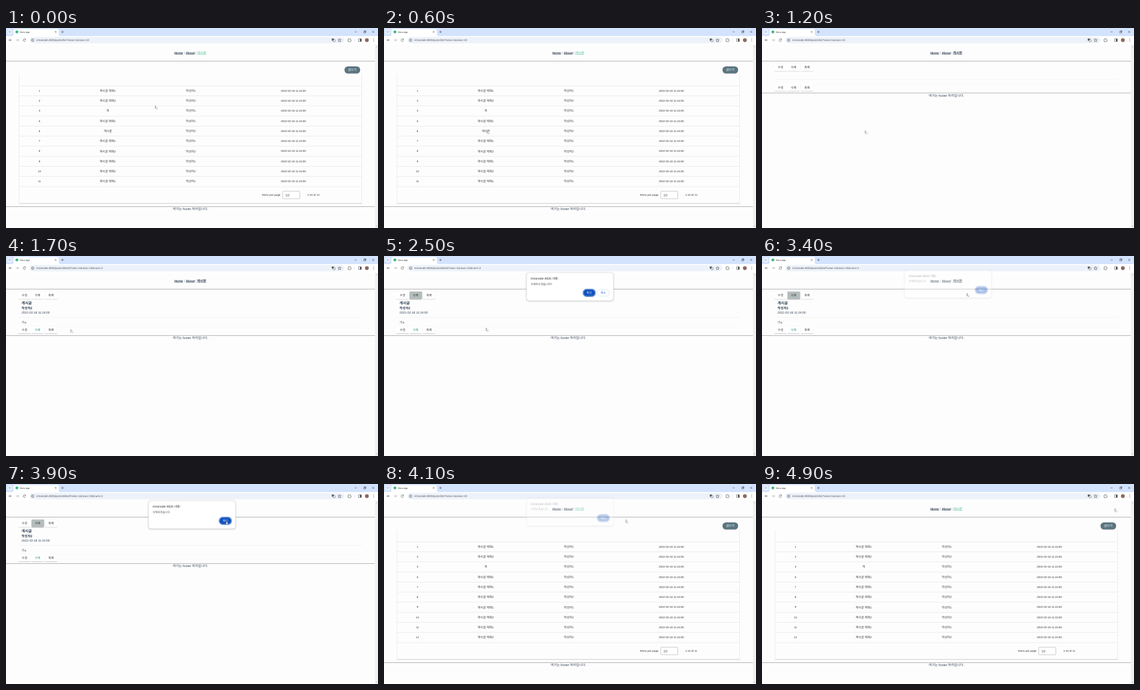
Recreate the animation shown at these times as an HTML page. Size 600x323 px, loop 5100 ms.

```html
<!DOCTYPE html>
<html lang="ko">
<head>
<meta charset="utf-8">
<title>Board</title>
<style>
  html, body { margin: 0; width: 100%; height: 100%; overflow: hidden; background: #fefdfe; }
  svg { display: block; width: 100vw; height: 100vh; }
  text {
    font-family: "Liberation Sans", "Noto Sans CJK KR", "Noto Sans CJK JP", sans-serif;
    white-space: pre;
    text-rendering: geometricPrecision;
  }
  .b { font-weight: 700; }
  .line { fill: none; stroke: #444; stroke-width: .6; }

  .list1, .blank, .detail, .list2, .ripple, .ask, .done, .urlList, .cursor {
    animation: 5100ms step-end infinite;
  }
  .list1 { animation-name: list1; }
  .blank { animation-name: blank; }
  .detail { animation-name: detail; }
  .list2 { animation-name: list2; }
  .urlList { animation-name: url; }
  .ripple { animation-name: ripple; }
  .ask { animation-name: ask; }
  .done { animation-name: done; }
  .cursor { animation-name: cursor; }

  @keyframes list1 { 0% { visibility: visible } 21.5%, 100% { visibility: hidden } }
  @keyframes blank { 0% { visibility: hidden } 21.5% { visibility: visible } 25.43%, 100% { visibility: hidden } }
  @keyframes detail { 0% { visibility: hidden } 25.43% { visibility: visible } 80.33%, 100% { visibility: hidden } }
  @keyframes list2 { 0% { visibility: hidden } 80.33%, 100% { visibility: visible } }
  @keyframes url { 0% { visibility: visible } 25.43% { visibility: hidden } 80.33%, 100% { visibility: visible } }
  @keyframes ripple { 0% { visibility: hidden } 43.08% { visibility: visible } 80.33%, 100% { visibility: hidden } }

  @keyframes ask {
    0% { opacity: 0; transform: translateY(-4.5px) }
    45.04% { opacity: .35; transform: translateY(-4.5px) }
    47% { opacity: 1; transform: none }
    64.64% { opacity: .35; transform: translateY(-4.5px) }
    66.6%, 100% { opacity: 0; transform: translateY(-4.5px) }
  }
  @keyframes done {
    0% { opacity: 0; transform: translateY(-4.5px) }
    66.6% { opacity: .35; transform: translateY(-4.5px) }
    68.57% { opacity: 1; transform: none }
    80.33% { opacity: .3; transform: translateY(-4.5px) }
    82.29%, 100% { opacity: 0; transform: translateY(-4.5px) }
  }
  @keyframes cursor {
    0% { transform: translate(241px, 125.3px); animation-timing-function: steps(3) }
    5.82% { transform: translate(166.6px, 165.5px) }
    33.27% { transform: translate(104.6px, 118.3px); animation-timing-function: steps(2) }
    37.2% { transform: translate(50px, 63px) }
    47% { transform: translate(110px, 120px); animation-timing-function: steps(2) }
    50.92% { transform: translate(220px, 112px); animation-timing-function: steps(2) }
    54.84% { transform: translate(296px, 85px) }
    58.76% { transform: translate(305.5px, 72.5px); animation-timing-function: steps(2) }
    62.68% { transform: translate(331px, 60px) }
    72.48% { transform: translate(343px, 60px); animation-timing-function: steps(2) }
    76.4% { transform: translate(355px, 60.5px) }
    80.33% { transform: translate(390.5px, 57.5px); animation-timing-function: steps(7) }
    94.05%, 100% { transform: translate(569.5px, 39.5px) }
  }
</style>
</head>
<body>
<svg id="stage" viewBox="0 0 600 323" preserveAspectRatio="none">
  <defs>
    <filter id="soft" x="-20%" y="-40%" width="140%" height="190%">
      <feDropShadow dx="0" dy=".6" stdDeviation=".6" flood-color="#000" flood-opacity=".32"/>
    </filter>
    <filter id="lift" x="-10%" y="-20%" width="120%" height="150%">
      <feDropShadow dx="0" dy=".5" stdDeviation=".9" flood-color="#000" flood-opacity=".32"/>
    </filter>
  </defs>
</svg>
<script>
  const INK = '#2c3e50', DARK = '#333', BLUE = '#0f52bd';
  const HOST = 'intranode:4826';

  // y is the middle of the line of text
  const text = (x, y, s, size, fill = DARK, anchor = 'start', cls = '') =>
    `<text x="${x}" y="${y + size * .36}" font-size="${size}" fill="${fill}" text-anchor="${anchor}" class="${cls}">${s}</text>`;
  const mid = (x, y, s, size, fill, cls) => text(x, y, s, size, fill, 'middle', cls);
  const rect = (x, y, w, h, fill, r = 0, more = '') =>
    `<rect x="${x}" y="${y}" width="${w}" height="${h}" rx="${r}" fill="${fill}" ${more}/>`;
  const path = (d, more = 'class="line"') => `<path d="${d}" ${more}/>`;
  const group = (cls, ...parts) => `<g class="${cls}">${parts.join('')}</g>`;
  const hr = y => rect(0, y, 595, 1, '#b6b6b6');

  function browser() {
    const url = HOST + '/posts/';
    return [
      rect(0, 0, 600, 13, '#d3e3fd'),
      rect(2, 2.2, 8, 8, '#e6effd', 2.5),
      path('M4.8 5.6 L6 6.9 L7.2 5.6'),
      path('M10 13 Q12 13 12 11 V4.5 Q12 1.8 14.7 1.8 H82.5 Q85.2 1.8 85.2 4.5 V11 Q85.2 13 87.2 13Z', 'fill="#fff"'),
      '<circle cx="17.6" cy="6.3" r="2.4" fill="#41b883"/>',
      text(22.5, 6.4, 'Moru App', 3.7),
      path('M78.9 5.1 l2.4 2.4 m0 -2.4 l-2.4 2.4'),
      path('M89 6.3 h4 m-2 -2 v4'),
      path('M562.3 6.3 h3.4 M577 5.4 h2.6 v2.6 h-2.6z M577.9 5.4 v-.9 h2.6 v2.6 h-.9 M590.7 4.7 l3.2 3.2 m0 -3.2 l-3.2 3.2'),
      rect(0, 13, 600, 14, '#fff'),
      path('M9.3 19.5 H5 m2 -2 l-2 2 l2 2'),
      path('M16 19.5 h4.3 m-2 -2 l2 2 l-2 2', 'class="line" style="stroke:#999"'),
      path('M31.2 18.4 A2 2 0 1 0 31.5 20.2 M31.6 17.2 v1.6 h-1.6'),
      rect(38, 14.6, 508, 10.2, '#edf2fa', 5.1),
      '<circle cx="43" cy="19.6" r="2.1" class="line"/>',
      path('M43 19.3 v1.4 M43 18.2 v.5'),
      group('urlList', text(49, 19.7, url + 'list?view=1&amp;rows=10', 4.48, '#555')),
      group('detail', text(49, 19.7, url + 'detail?view=1&amp;rows=10&amp;num=4', 4.48, '#555')),
      rect(525.5, 17, 3.4, 3.6, '#555', .5),
      rect(527.8, 18.8, 3, 3.4, '#fff', .5, 'stroke="#555" stroke-width=".6"'),
      path('M538 17 l.8 1.7 1.9 .2 -1.4 1.3 .4 1.9 -1.7 -1 -1.7 1 .4 -1.9 -1.4 -1.3 1.9 -.2z'),
      path('M551.8 17.8 h1.4 a.8 .8 0 0 1 1.6 0 h1.2 v1.4 a.8 .8 0 0 1 0 1.6 v1.2 h-4.2z'),
      rect(561.8, 17, .5, 5, '#c5d7f5'),
      path('M568.7 17.5 h4.4 v4.2 h-4.4z'),
      rect(571, 17.5, 2.1, 4.2, '#444'),
      '<circle cx="582" cy="19.6" r="3.1" fill="#8a6a5d"/>',
      ...[17.6, 19.6, 21.6].map(y => `<circle cx="593" cy="${y}" r=".5" fill="#444"/>`),
      rect(595, 27, 5, 296, '#f1f1f1'),
      path('M596.3 30.8 l1.2 -1.4 1.2 1.4z M596.3 319.3 l1.2 1.4 1.2 -1.4z', 'fill="#a3a3a3"')
    ].join('');
  }

  function nav(active) {
    const c = active ? '#42c08a' : INK;
    return [
      text(271.5, 40.3, 'Home', 5, INK, 'start', 'b'),
      text(290, 40.3, 'About', 5, INK, 'start', 'b'),
      text(308, 40.3, '게시판', 5.4, c, 'start', active ? '' : 'b'),
      rect(271.5, 42.5, 14, .5, INK), rect(290, 42.5, 14, .5, INK), rect(308, 42.5, 15, .5, c),
      rect(287.4, 38.2, .4, 4.6, '#777'), rect(305.8, 38.2, .4, 4.6, '#777'),
      hr(53)
    ].join('');
  }

  const footer = y => hr(y) + mid(297.5, y + 4.5, '여기는 footer 자리입니다.', 5.3, INK);

  function row(id, i) {
    const y = 101.2 + i * 16.27, kind = id % 2 ? 1 : 2;
    const title = { 3: '게', 6: '게시글' }[id] || '게시글 제목' + kind;
    return [
      rect(21, y - 8.2, 553, .6, '#e2e2e2'),
      mid(54, y, id, 4.4), mid(164, y, title, 4.8), mid(298, y, '작성자' + kind, 4.8),
      mid(463.5, y, '2022-02-18 11:24:00', 4.4)
    ].join('');
  }

  function list(cls, ids, total) {
    return group(cls,
      nav(true),
      rect(546, 61.9, 25.2, 11.4, '#5a7480', 5.7, 'filter="url(#soft)"'),
      mid(558.6, 67.6, '글쓰기', 5, '#fff'),
      rect(20.8, 74, .6, 209, '#e3e3e3'), rect(573.4, 74, .6, 209, '#e3e3e3'),
      ...ids.map(row),
      rect(21, 255.8, 553, .6, '#e2e2e2'),
      rect(21, 282.8, 553, .9, '#c9c9c9'),
      text(413, 269.8, 'Items per page:', 4.4),
      rect(446.3, 263.6, 27.6, 12.2, '#fff', 1, 'stroke="#aaa" stroke-width=".6"'),
      text(450.5, 269.8, '10', 5.8, '#555'),
      text(486, 269.8, '1-10 of ' + total, 4.35),
      footer(288));
  }

  const buttons = (y, mark = DARK) =>
    [['수정', 20], ['삭제', 41], ['목록', 62.7]].map(([s, x], i) =>
      rect(x, y - 5.8, 20, 11.4, '#fff', 1, 'filter="url(#soft)"') +
      mid(x + 10, y, s, 4.8, i === 1 ? mark : DARK)).join('');

  const blank = () => group('blank',
    nav(false), buttons(63.6),
    rect(20, 82.8, 555, .5, '#e8e8e8'), rect(20, 90.8, 555, .4, '#f0f0f0'),
    buttons(95.8), footer(104.5));

  const detail = () => group('detail',
    nav(false), buttons(63.6),
    text(25, 75.4, '게시글', 6, INK, 'start', 'b'),
    text(25, 84.1, '작성자2', 5.3, INK, 'start', 'b'),
    text(25, 91.5, '2022-02-18 11:24:00', 4.96, INK),
    rect(20, 98.8, 555, .5, '#e8e8e8'),
    text(25, 106.7, '가a', 5.2, '#555'),
    rect(20, 114, 555, .4, '#f0f0f0'),
    buttons(119.3, '#2a8c86'), footer(128));

  const pressed = () => group('ripple',
    rect(41, 57.6, 20.4, 11.8, '#b5bcbc', 1, 'filter="url(#soft)"'), mid(51, 63.6, '삭제', 4.8));

  const okButton = x =>
    rect(x - 10.5, 53.1, 21, 12.8, BLUE, 6.4) +
    rect(x - 9.6, 54, 19.2, 11, 'none', 5.5, 'stroke="#dbe6fa" stroke-width=".6"') +
    mid(x, 59.5, '확인', 4.5, '#fff');

  const dialog = (cls, message, ...controls) => group(cls,
    rect(230, 27, 140, 45, '#fff', 4, 'stroke="#d4d4d4" stroke-width=".5" filter="url(#lift)"'),
    text(236.5, 36.2, HOST + ' 내용:', 5),
    text(236.5, 45.2, message, 4.4, '#444'),
    ...controls);

  document.getElementById('stage').insertAdjacentHTML('beforeend', [
    rect(0, 0, 600, 323, '#fefdfe'),
    list('list1', [1, 2, 3, 5, 6, 7, 8, 9, 10, 11], 12),
    blank(),
    detail(),
    pressed(),
    list('list2', [1, 2, 3, 5, 7, 8, 9, 10, 11, 12], 11),
    browser(),
    dialog('ask', '삭제하시겠습니까?', okButton(331),
      rect(344.2, 54.1, 19, 10.8, '#fff', 5.4, 'stroke="#c6d6f0" stroke-width=".6"'),
      mid(353.7, 59.5, '취소', 4.5, '#0b57d0')),
    dialog('done', '삭제되었습니다', okButton(353.8)),
    group('cursor',
      path('M0 0 V5 L1.2 4 L2 5.8 L2.9 5.4 L2.1 3.6 H3.6Z', 'fill="#fff" stroke="#777" stroke-width=".2"'),
      path('M0 .2 V5 M2 5.7 L2.9 5.4'))
  ].join(''));
</script>
</body>
</html>
```
